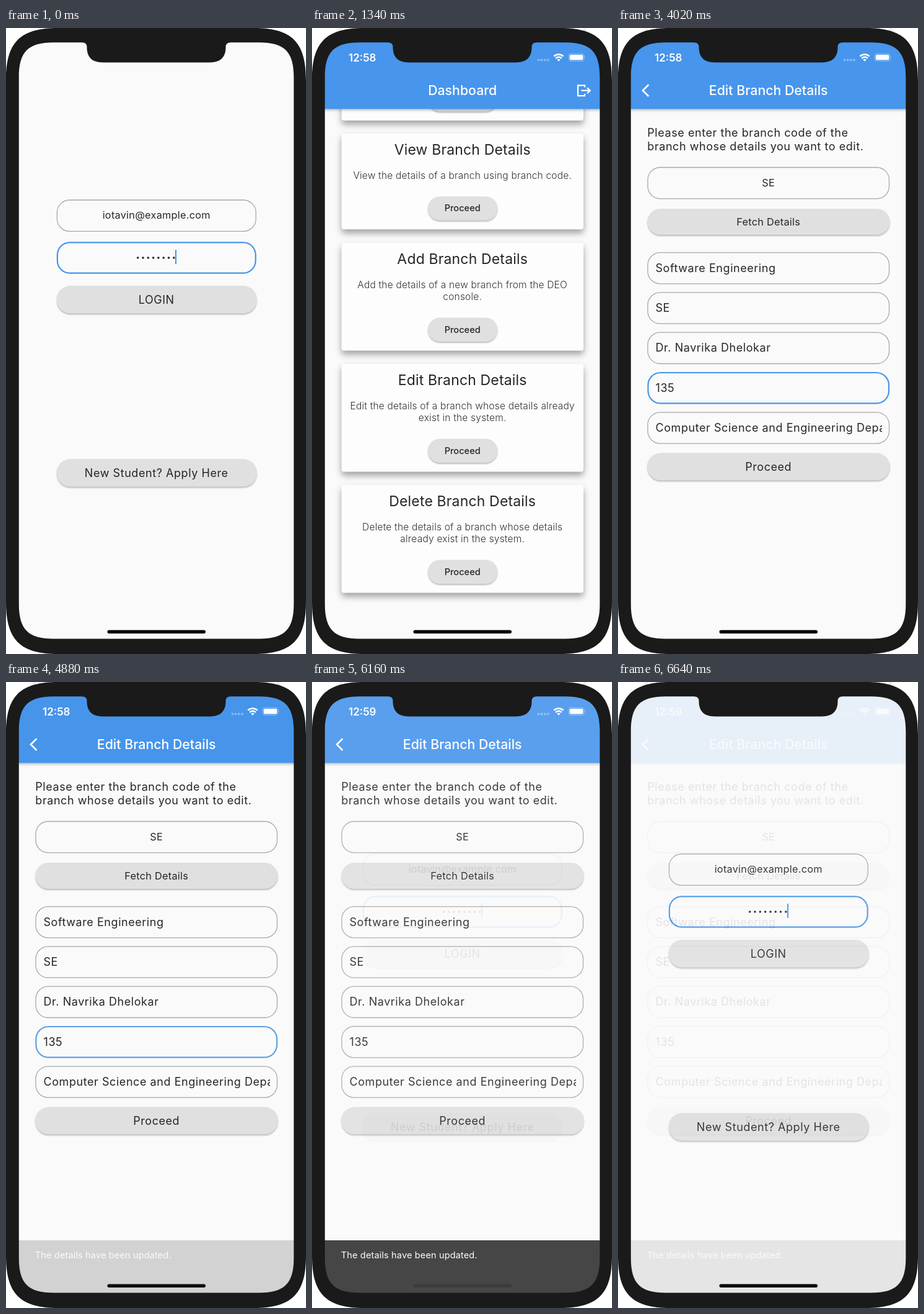
An HTML page that plays this animation: 484 px wide and 1008 px high, repeating every 6.7 s.

```html
<!DOCTYPE html>
<html lang="en">
<head>
<meta charset="utf-8">
<title>Branch admin app</title>
<style>
  html, body { margin: 0; width: 100%; height: 100%; overflow: hidden; background: #fff; }
  svg { display: block; width: 100%; height: 100%; }
  text { font-family: Inter, Roboto, sans-serif; fill: #262626; white-space: pre; }
  .title { font-size: 21.3px; font-weight: 500; fill: #fff; }
  .clock { font-size: 17px; font-weight: 600; fill: #fff; }
  .heading { font-size: 23px; letter-spacing: .16px; }
  .note { font-size: 15.5px; font-weight: 300; letter-spacing: .2px; fill: #333; }
  .small { font-size: 14.6px; font-weight: 500; }
  .body { font-size: 18px; letter-spacing: .56px; }
  .mid { font-size: 16.3px; letter-spacing: .25px; }
  .hint { fill: #757575; }
  .snack { font-size: 14.5px; letter-spacing: .15px; fill: #fff; }
  .paper { fill: #fafafa; }
  .field { fill: none; stroke: #a8a8a8; stroke-width: 1.3; }
  .focus { stroke: #4795ec; stroke-width: 2.2; }
  .button { fill: #e0e0e0; filter: drop-shadow(0 2px 1.3px rgba(0, 0, 0, .25)); }
  .card { fill: #fdfdfd; filter: drop-shadow(0 6px 5.5px rgba(0, 0, 0, .36)); }
  .bar { fill: #4795ec; filter: drop-shadow(0 2px 2px rgba(0, 0, 0, .25)); }
  .line { fill: none; stroke: #fff; stroke-width: 2.3; }
</style>
</head>
<body>
<svg viewBox="0 0 484 1008">
  <defs>
    <clipPath id="fieldClip"><rect x="60" y="620" width="366" height="48"/></clipPath>
  </defs>
  <g id="screens"></g>
  <g fill="#1a1a1a">
    <path id="bezel" fill-rule="evenodd"/>
    <path d="M123 22.5V23.3Q130.5 23.3 130.5 31C130.5 47 139 55.4 156 55.4H329
      C346 55.4 354.5 47 354.5 31Q354.5 23.3 362 23.3V22.5Z"/>
  </g>
</svg>
<script>
const LOOP = 6700, STEP = 60;
const MIDDLE = 242.7;

// Rectangle with continuous-curvature corners of nominal radius r.
const squircle = (x, y, w, h, r) => {
  const reach = r * 1.3, pull = r * .952;
  const dx = w - 2 * reach, dy = h - 2 * reach;
  const corner = (sx, sy, flat) => {
    const near = flat ? [pull, 0, reach, reach - pull] : [0, pull, reach - pull, reach];
    return 'c' + [...near, reach, reach].map((v, i) => v * (i % 2 ? sy : sx)).join(' ');
  };
  return `M${x + reach} ${y}h${dx}${corner(1, 1, true)}v${dy}${corner(-1, 1, false)}` +
    `h${-dx}${corner(-1, -1, true)}v${-dy}${corner(1, -1, false)}z`;
};

const rect = (cls, x, y, w, h, r = 0) =>
  `<rect class="${cls}" x="${x}" y="${y}" width="${w}" height="${h}" rx="${r}"/>`;
const left = (cls, x, y, str) => `<text class="${cls}" x="${x}" y="${y}">${str}</text>`;
const center = (cls, y, str) =>
  `<text class="${cls}" x="${MIDDLE}" y="${y}" text-anchor="middle">${str}</text>`;
const button = (x, y, w, h) => rect('button', x, y, w, h, Math.min(h / 2, 21.4));
const field = (x, y, w, focused) => {
  const inset = focused ? .5 : 0;
  return rect(focused ? 'field focus' : 'field',
    x + inset, y + inset, w - 2 * inset, 50.3 - 2 * inset, 20);
};

const page = (content, indicator = '#000') =>
  rect('paper', 20, 22, 446, 963) + content +
  `<rect x="163.5" y="969.4" width="158.5" height="5.5" rx="2.7" fill="${indicator}"/>`;

const header = (title, clock, icon) => `
  ${rect('bar', 20, 22, 446, 108.4)}
  ${left('clock', 59, 53.7, clock)}
  <path d="M365.5 51.5h16" stroke="#fff" stroke-opacity=".35" stroke-width="4"
    stroke-linecap="round" stroke-dasharray="0 5.1"/>
  <g fill="none" stroke="#fff" stroke-width="2.5">
    <path d="M390.3 45.7a11 11 0 0 1 15.4 0M393.2 48.8a6.9 6.9 0 0 1 9.6 0"/>
    <path d="M395.4 51.1a3.7 3.7 0 0 1 5.2 0L398 53.7Z" fill="#fff" stroke="none"/>
  </g>
  <rect x="414" y="41.3" width="25" height="12" rx="3.6" fill="none" stroke="#fff" stroke-opacity=".4"/>
  <rect x="415.7" y="43" width="21.6" height="8.6" rx="2.2" fill="#fff"/>
  <path d="M440.3 45.3q1.6 2 0 4z" fill="#fff" fill-opacity=".5"/>
  ${center('title', 108, title)}${icon}`;

const backIcon = '<path class="line" style="stroke-width:2.7" d="M49.4 91.2L40 100.6L49.4 110"/>';
const exitIcon = `<path class="line" d="M440 95.5V92.3H429V109.2H440V106"/>
  <path class="line" d="M434.5 100.7H448M444 96.2L448.6 100.7L444 105.2"/>`;

const login = page(`
  ${field(82.4, 277, 320.8)}${center('mid', 307, 'iotavin@example.com')}
  ${field(82.4, 344.8, 320.8, true)}
  <path d="M212.7 370h60" stroke="#222" stroke-width="3.5" stroke-linecap="round" stroke-dasharray="0 8.3"/>
  <rect x="273" y="357" width="2" height="23" fill="#4795ec"/>
  ${button(82, 415, 322.5, 44.5)}${center('body', 444, 'LOGIN')}
  ${button(82, 694, 322.5, 44.5)}${center('body', 723, 'New Student? Apply Here')}`);

const card = (top, heading, ...notes) => {
  const extra = (notes.length - 1) * 19.5;
  const buttonTop = top + 101.2 + extra;
  return rect('card', 47.7, top, 390.3, 154.3 + extra, 4) +
    center('heading', top + 34, heading) +
    notes.map((note, i) => center('note', top + 73.2 + i * 19.5, note)).join('') +
    button(187, buttonTop, 112.3, 38.6) + center('small', buttonTop + 24.2, 'Proceed');
};

const dashboard = page(`
  ${card(-5.3, '', '')}
  ${card(170, 'View Branch Details', 'View the details of a branch using branch code.')}
  ${card(345.7, 'Add Branch Details', 'Add the details of a new branch from the DEO', 'console.')}
  ${card(540.7, 'Edit Branch Details', 'Edit the details of a branch whose details already', 'exist in the system.')}
  ${card(735.7, 'Delete Branch Details', 'Delete the details of a branch whose details', 'already exist in the system.')}
  ${header('Dashboard', '12:58', exitIcon)}`);

const editForm = (clock, code, extra = '', indicator) => page(`
  ${header('Edit Branch Details', clock, backIcon)}
  ${left('body', 47.3, 175, 'Please enter the branch code of the')}
  ${left('body', 47.3, 197.3, 'branch whose details you want to edit.')}
  ${field(48, 224.5, 389.5)}
  ${center(code ? 'mid' : 'mid hint', 254.7, code || 'Branch Code')}
  ${button(47.5, 291, 391, 42)}${center('mid', 318, 'Fetch Details')}
  ${extra}`, indicator);

const details = focusIndex => [
  'Software Engineering', 'SE', 'Dr. Navrika Dhelokar', '135',
  'Computer Science and Engineering Department'
].map((value, i) => {
  const top = 361.6 + i * 64.3;
  const label = left('body', 60.5, top + 31, value);
  return field(48, top, 389.5, i === focusIndex) +
    (i === 4 ? `<g clip-path="url(#fieldClip)">${label}</g>` : label);
}).join('') + button(47.5, 684.3, 391, 44) + center('body', 713, 'Proceed');

const snackbar = '<rect x="20" y="899" width="446" height="86" fill="#323232"/>' +
  left('snack', 46.8, 928, 'The details have been updated.');

// Each screen fades in over the one below, starting at its time in ms.
const screens = [
  [0, login],
  [800, dashboard],
  [2140, editForm('12:58', '')],
  [3480, editForm('12:58', 'SE', details(3))],
  [4820, editForm('12:59', 'SE', details() + snackbar, '#434343')],
  [6160, login]
];

document.getElementById('bezel').setAttribute('d',
  squircle(0, 0, 484, 1008, 65) + squircle(20.8, 23.2, 443.5, 960.2, 43));

const stage = document.getElementById('screens');
stage.innerHTML = screens.map(([, content]) => `<g>${content}</g>`).join('');

screens.forEach(([start], i) => {
  if (!start) return;
  const steps = Math.min(10, (LOOP - start) / STEP);
  const at = ms => Math.min(1, (ms - .5) / LOOP);
  const end = start + steps * STEP;
  stage.children[i].animate([
    { offset: 0, opacity: 0 },
    { offset: at(start), opacity: 0, easing: `steps(${steps}, start)` },
    { offset: at(end), opacity: steps / 10 },
    { offset: 1, opacity: steps / 10 }
  ], { duration: LOOP, iterations: Infinity }).startTime = 0;
});
</script>
</body>
</html>
```
